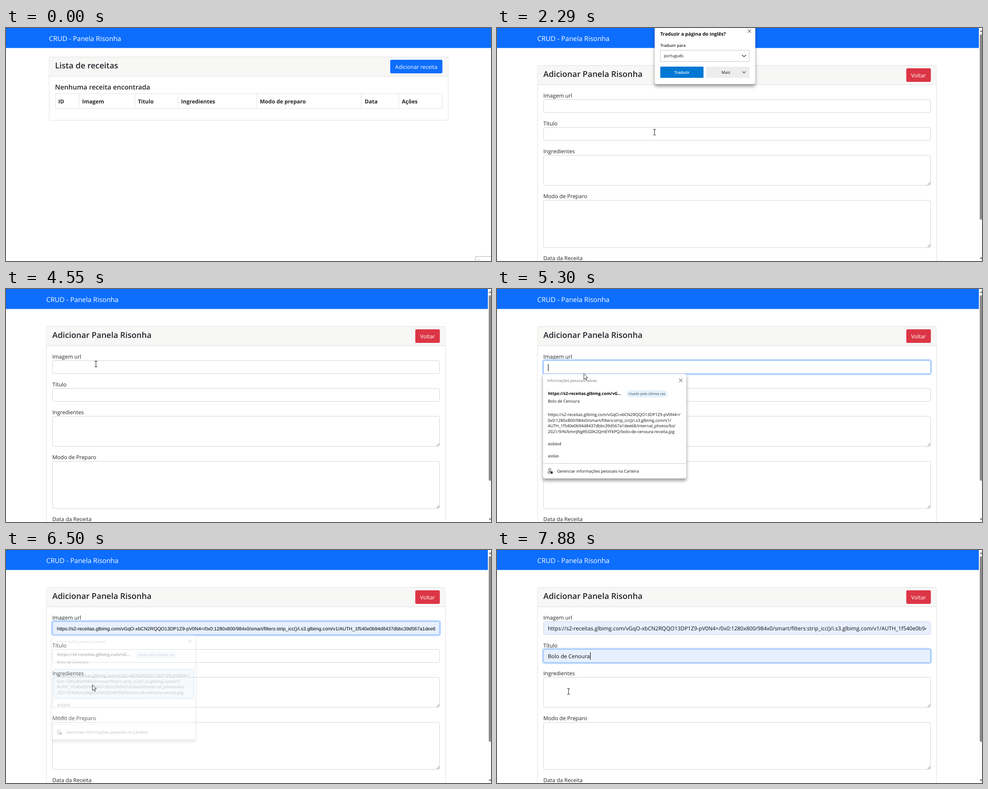
An HTML page for the animation above (8 s loop, 1078 px wide and 519 px high).

```html
<!DOCTYPE html>
<html lang="pt">
<head>
<meta charset="utf-8">
<title>CRUD - Panela Risonha</title>
<style>
html, body { margin: 0; width: 100%; height: 100%; overflow: hidden; background: #fff; }
svg { display: block; width: 100%; height: 100%; }
text { font-family: "Open Sans", "Noto Sans", sans-serif; text-rendering: geometricPrecision; white-space: pre; }
.plain { font-family: "Liberation Sans", Arial, sans-serif; }
.float { filter: drop-shadow(0 5px 3.5px rgba(0, 0, 0, .38)); }
</style>
</head>
<body>
<svg id="stage" viewBox="0 0 1078 519" xmlns="http://www.w3.org/2000/svg"></svg>
<script>
const LOOP = 8000;
const INK = '#212529', BLUE = '#0d6efd', LINE = '#ced4da';
const FONT_SCALE = 0.945;
const NAV_HEIGHT = 44.5;
const URL_LINES = [
  'https://s2-receitas.glbimg.com/vGqO-xbCN2RQQO13DP1Z9-pV0N4=/',
  '0x0:1280x800/984x0/smart/filters:strip_icc()/i.s3.glbimg.com/v1/',
  'AUTH_1f540e0b94d8437dbbc39d567a1dee68/internal_photos/bs/',
  '2021/9/N/bmnJNgR5G0K2QmEYFkPQ/bolo-de-cenoura-receita.jpg'
];
const CAKE = 'Bolo de Cenoura';

// Markup helpers
const text = (x, y, s, size = 12.7, fill = INK, weight = 400, extra = '') =>
  `<text x="${x}" y="${y}" font-size="${(size * FONT_SCALE).toFixed(2)}" fill="${fill}" font-weight="${weight}" ${extra}>${s}</text>`;
const rect = (x, y, w, h, fill, extra = '') =>
  `<rect x="${x}" y="${y}" width="${w}" height="${h}" fill="${fill}" ${extra}/>`;
const path = (d, stroke, width = 1, extra = '') =>
  `<path d="${d}" fill="none" stroke="${stroke}" stroke-width="${width}" ${extra}/>`;
const group = (id, body, extra = '') => `<g id="${id}" ${extra}>${body}</g>`;
const cross = (x, y) => path(`M${x - 3.7} ${y - 3.7}l7.4 7.4m0 -7.4l-7.4 7.4`, '#222');
const chevron = (x, y, r) => path(`M${x - r} ${y - r / 2}l${r} ${r}l${r} ${-r}`, '#222', 1.1);
const mid = 'text-anchor="middle"';

function navbar(width, x) {
  return rect(0, 0, width, NAV_HEIGHT, BLUE) + text(x, 28.5, 'CRUD - Panela Risonha', 15.9, '#fff');
}

function cardTop(x, y, bottom) {
  return rect(x + .5, y + .5, 887, bottom - y, '#fff', 'stroke="#dfdfdf" rx="3"') +
    rect(x + 1, y + 1, 886, 43, '#f7f7f6', 'rx="2"') +
    path(`M${x} ${y + 43.5}h888`, '#dfdfdf');
}

function listPage() {
  const cols = [['ID', 109.5], ['Imagem', 162.5], ['Titulo', 286.5], ['Ingredientes', 382.5],
    ['Modo de preparo', 557.5], ['Data', 790.5], ['Ações', 873]];
  return navbar(1078, 95.5) +
    cardTop(95.5, 64, 205) + text(109, 90, 'Lista de receitas', 19.05, INK, 600) +
    rect(852.4, 69.4, 119.2, 33.2, 'none', 'id="btnRing" rx="4.5" stroke="#a3c6fe" stroke-width="3.2"') +
    rect(854, 70.7, 116, 30.4, BLUE, 'id="btn" rx="3"') +
    text(912, 91, 'Adicionar receita', 12.7, '#fff', 400, mid) +
    text(109, 137, 'Nenhuma receita encontrada', 15.8, INK, 600) +
    rect(109.5, 146.5, 860, 33, 'none', 'stroke="#dee2e6"') +
    cols.map(([name, x], i) => (i ? path(`M${x} 146.5v33`, '#dee2e6') : '') +
      text(x + 6.8, 168, name, 12.7, INK, 700)).join('') +
    group('corner', rect(1044, 509, 50, 20, '#fff', 'stroke="#c6c6c6" stroke-width="1.5"') +
      text(1048, 523, 'C', 11, '#b9bcc6'));
}

const FIELDS = [
  ['Imagem url', 159, 30], ['Título', 221, 30],
  ['Ingredientes', 283, 68], ['Modo de Preparo', 383.5, 106]
];

function field([label, y, h], i) {
  const box = `x="103.5" y="${y + .5}" width="860" height="${h - 1}" rx="3"`;
  const grip = h > 30 ? path(`M957 ${y + h - 1.5}l6 -6m-3 6l3 -3`, '#666', .9) : '';
  return text(103, y - 4.5, label) +
    `<rect id="glow${i}" ${box} fill="none" stroke="#c2dbfe" stroke-width="7" opacity="0"/>` +
    `<rect id="box${i}" ${box} fill="#fff" stroke="${LINE}"/>` + grip;
}

function formPage() {
  const url = URL_LINES.join('');
  const clip = 'clip-path="url(#inner)"';
  const plain = (id, y, s) => group(id, `<text class="plain" x="113" y="${y}" font-size="10.6" fill="#000">${s}</text>`, clip);
  return '<clipPath id="inner"><rect x="113" y="155" width="841" height="100"/></clipPath>' +
    navbar(1071, 89.5) +
    rect(1071, 0, 7, 519, '#fcfcfc') + rect(1073, 14, 6, 413, '#8b8b8b', 'rx="2.8"') +
    '<path d="M1073 9l3 -4.5l3 4.5zM1073 511l3 4.5l3 -4.5z" fill="#7d7d7d"/>' +
    cardTop(89.5, 83, 540) + text(103, 109, 'Adicionar Panela Risonha', 19.05, INK, 600) +
    rect(909.7, 89.7, 54.6, 30.4, '#dc3545', 'rx="3"') + text(937, 110, 'Voltar', 12.7, '#fff', 400, mid) +
    FIELDS.map(field).join('') + text(103, 517, 'Data da Receita') +
    plain('urlPreview', 178.5, url) + group('urlText', text(113, 178.5, url, 12.7, '#111'), clip) +
    plain('cakePreview', 240.5, CAKE) + group('cakeText', text(113, 240.8, CAKE, 12.7, '#111')) +
    path('M0 -8v16', '#000', 1.1, 'id="caret"');
}

function translatePopup() {
  return rect(350.5, -8, 223.5, 133, '#fff', 'rx="4" class="float" stroke="#d4d4d4" stroke-width=".6"') +
    text(363, 17, 'Traduzir a página do inglês?', 11.2, '#111', 700) + cross(561, 7) +
    text(363, 42, 'Traduzir para', 9.3, '#222', 600) +
    rect(363.5, 49.5, 197, 25, '#fff', 'rx="1.5" stroke="#c6c6c6"') +
    text(371, 65.3, 'português', 9.6, '#111') + chevron(549, 62, 4.5) +
    rect(363, 86, 96, 25, '#0078d4', 'rx="1.5"') + text(411, 101.7, 'Traduzir', 9.1, '#fff', 600, mid) +
    rect(465, 86, 96, 25, '#ededed', 'rx="1.5"') + text(499, 101.7, 'Mais', 9.4, '#111') + chevron(549, 98.5, 3.6);
}

function suggestBox(id, top, height, tagX, lead, rows) {
  const foot = top + height - 34;
  return group(id,
    rect(102, top, 319, height, '#fff', 'rx="4" class="float" stroke="#cfcfcf" stroke-width=".6"') +
    text(112, top + 17.5, 'Informações pessoais salvas', 8.8, '#707070') + cross(408.5, top + 14.5) +
    rect(106.5, 0, 311, 10, '#e2eefa', `id="${id}Mark" stroke="#5a9fdc" rx="1.5"`) +
    text(113.5, top + 47.3, lead, 9.7, '#000', 700) +
    rect(tagX, top + 36.5, 92, 16, '#e5f2fc', 'rx="8"') +
    text(tagX + 46, top + 47.4, 'Usado pela última vez', 8.15, '#5b7286', 600, mid) +
    rows.map(([y, s, size = 9.6]) => text(113, y, s, size, '#111')).join('') +
    path(`M102 ${foot + .5}h319`, '#cbcbcb') +
    `<circle cx="117.3" cy="${foot + 14.5}" r="2.6" fill="none" stroke="#222"/>` +
    path(`M118 ${foot + 19}h-3.2q-1.8 0 -1.6 1.8q.6 2.2 4.3 2.4`, '#222') +
    rect(118.6, foot + 18.2, 5.2, 5, '#222', 'rx="1"') +
    text(133.5, foot + 20.8, 'Gerenciar informações pessoais na Carteira', 9.5, '#111'));
}

const urlRows = [[252.5, CAKE], ...URL_LINES.map((s, i) => [282.8 + i * 12.8, s, 9.75]), [348, 'asdasd'], [375, 'asdas']];
const cakeRows = [CAKE, 'arroz doce', 'bolo de feijão', 'bolo de feijão 232', 'bolo de feijão 235', 'bolo de feijão 898']
  .map((s, i) => [329 + i * 27, s]);

const pointers =
  group('arrow', '<path d="M0 0V12.8L2.9 10.1L4.8 14.6L6.8 13.7L4.9 9.3H8.9Z" fill="#fff" stroke="#111" stroke-width=".9"/>') +
  group('beam', path('M-3 -6.3h2l1 .8l1 -.8h2M0 -5.5v11M-3 6.3h2l1 -.8l1 .8h2', '#222', 1.1)) +
  group('hand', '<path d="M-1.4 0q1.4 -1.4 2.6 0v5l5 1.2q1.4 .5 1.2 2l-1 5.3h-6.6l-4.4 -5.4q.6 -1.6 3.2 0z" fill="#fff" stroke="#111" stroke-width=".9"/>');

document.getElementById('stage').innerHTML =
  rect(0, 0, 1078, 519, '#fff') + group('list', listPage()) +
  group('form', formPage() + group('popup', translatePopup()) +
    suggestBox('urlBox', 189, 233, 287.5, 'https://s2-receitas.glbimg.com/vG...', urlRows) +
    suggestBox('cakeBox', 251, 260, 198, CAKE, cakeRows)) +
  group('pointer', pointers);

const el = id => document.getElementById(id);
const set = (id, attrs) => { for (const k in attrs) el(id).setAttribute(k, attrs[k]); };
const show = (id, on) => { el(id).style.display = on ? '' : 'none'; };

// Pointer stops: time, x, y
const STOPS = [
  [0, 1090, 532], [70, 1064, 506], [740, 898, 91], [1300, 898, 91], [1750, 620, 243],
  [2090, 419, 261], [2180, 419, 261], [2490, 203, 170], [2600, 203, 170], [3390, 545, 9],
  [3560, 557, 2], [3800, 557, 2], [4060, 531, 32], [4180, 531, 32], [4410, 200, 167],
  [4520, 200, 167], [4900, 197, 172], [5240, 193, 188.5], [5400, 193, 188.5], [5700, 195, 290],
  [6060, 192, 300], [6560, 192, 300], [6860, 184, 236], [7190, 181, 273], [7260, 181, 273],
  [7400, 168, 322], [7650, 163, 322], [7850, 159, 315], [LOOP, 159, 315]
];

const ramp = (t, a, b) => Math.min(1, Math.max(0, (t - a) / (b - a)));

function pointerAt(t) {
  const i = STOPS.findIndex(s => s[0] > t);
  const [t0, x0, y0] = STOPS[i - 1], [t1, x1, y1] = STOPS[i];
  const p = (t - t0) / (t1 - t0), k = p + (p * p * (3 - 2 * p) - p) * .6;
  return [x0 + (x1 - x0) * k, y0 + (y1 - y0) * k];
}

const inside = (x, y, l, t, r, b) => x >= l && x <= r && y >= t && y <= b;

const URL_HITS = [[218, 262], [265, 331], [331, 358], [358, 385]];
const CAKE_HITS = [[280, 311], ...[0, 1, 2, 3, 4, 5].map(i => [312 + i * 27, 339 + i * 27])];

function mark(id, hits, y, active) {
  const hit = active && hits.find(([a, b]) => y >= a && y < b);
  show(id + 'Mark', hit);
  if (hit) set(id + 'Mark', { y: hit[0] + .5, height: hit[1] - hit[0] - 1 });
  return !!hit;
}

function draw(t) {
  const [x, y] = pointerAt(t);
  const onForm = t >= 1820;
  show('list', !onForm);
  show('form', onForm);

  const overBtn = !onForm && inside(x, y, 854, 71, 970, 101);
  const clicked = t >= 1300;
  set('btn', { fill: overBtn || clicked ? '#0b5ed7' : BLUE });
  set('btnRing', { opacity: ramp(t, 1300, 1450) });
  show('corner', t < 70);

  const popup = t < 2090 ? 0 : 1 - ramp(t, 3930, 4060);
  const urlBox = t < 5100 ? 0 : 1 - ramp(t, 6300, 6570);
  const cakeBox = t < 7050 ? 0 : 1 - ramp(t, 7600, 7800);
  set('popup', { opacity: popup });
  set('urlBox', { opacity: urlBox });
  set('cakeBox', { opacity: cakeBox });

  const urlHover = mark('urlBox', URL_HITS, y, urlBox > 0);
  const cakeHover = mark('cakeBox', CAKE_HITS, y, cakeBox > 0);
  const urlDone = t >= 6600, cakeDone = t >= 7600;
  const urlShown = urlHover || t >= 6300;
  show('urlPreview', urlShown && !urlDone);
  show('urlText', urlDone);
  show('cakePreview', cakeHover && !cakeDone);
  show('cakeText', cakeDone);

  // Focus: the first field, then the second
  const glow = [ramp(t, 4930, 5080) - ramp(t, 6870, 7020), ramp(t, 6870, 7020)];
  const filled = [urlShown, cakeHover || cakeDone];
  glow.forEach((g, i) => {
    set('glow' + i, { opacity: g });
    set('box' + i, { fill: filled[i] ? '#e8f0fe' : '#fff', stroke: g > .5 ? '#86b7fe' : LINE });
  });

  const second = t >= 6870;
  const start = cakeDone ? 7600 : second ? 6870 : 4930;
  const hidden = second ? cakeHover && !cakeDone : urlShown;
  show('caret', t >= 4930 && !hidden && (t - start) % 1000 < 500);
  set('caret', { transform: `translate(${cakeDone ? 207.5 : 114} ${second ? 236 : 175})` });

  const overFloat = popup > 0 && inside(x, y, 350, 0, 574, 125) ||
    urlBox > 0 && inside(x, y, 102, 188, 421, 422) ||
    cakeBox > 0 && inside(x, y, 102, 251, 421, 511);
  const overField = t >= 1680 && !overFloat &&
    FIELDS.some(([, top, h]) => inside(x, y, 103, top, 964, top + h));
  const kind = overBtn ? 'hand' : overField ? 'beam' : 'arrow';
  ['arrow', 'beam', 'hand'].forEach(k => show(k, k === kind));
  set('pointer', { transform: `translate(${x.toFixed(1)} ${y.toFixed(1)})` });
}

const begin = performance.now();
function tick() {
  draw((performance.now() - begin) % LOOP);
  requestAnimationFrame(tick);
}
tick();
</script>
</body>
</html>
```
